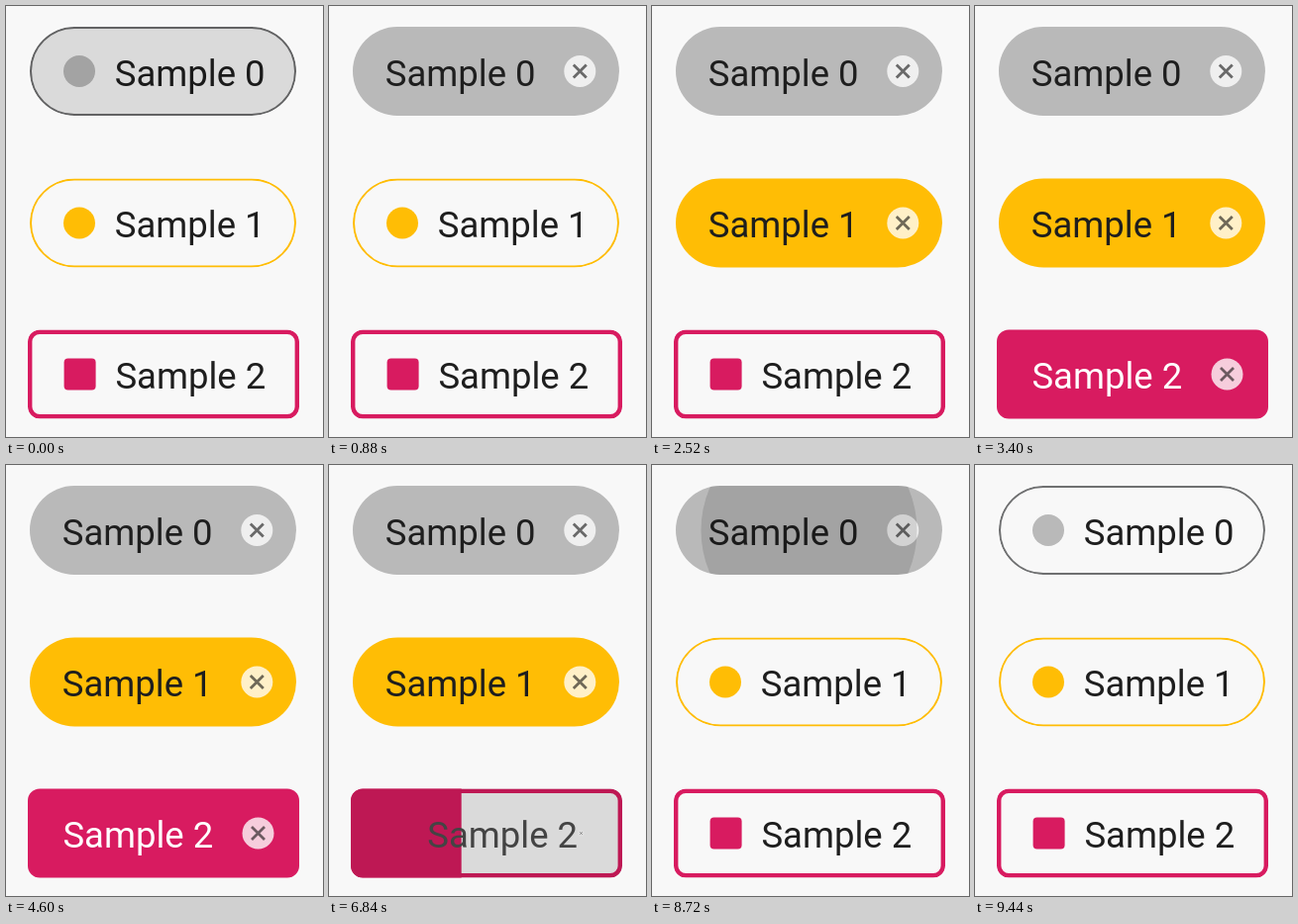
Animation of 320 by 436 pixels, one loop 10 s. Source, as an HTML page with a canvas:

```html
<!DOCTYPE html>
<html lang="en">
<head>
<meta charset="utf-8">
<title>Filter chips</title>
<style>
  html, body { margin: 0; width: 100%; height: 100%; overflow: hidden; background: #f8f8f8; }
  canvas { display: block; width: 320px; height: 436px; }
</style>
</head>
<body>
<canvas id="stage"></canvas>
<script>
const W = 320, H = 436, LOOP = 10000;
const SELECT = 450, DESELECT = 250;
const RIPPLE_GROW = 200, RIPPLE_HOLD = 180, RIPPLE_FADE = 200, RIPPLE_ALPHA = 0.12;

// on / off: [press time, start of the toggle]
const chips = [
  { label: 'Sample 0', x: 24, y: 21, w: 269, h: 90, round: 45, line: 2,
    color: '#b9b9b9', outline: '#6f7071', ink: [30, 30, 30],
    on: [-160, 50], off: [8640, 8760] },
  { label: 'Sample 1', x: 24, y: 174.5, w: 269, h: 90, round: 45, line: 2,
    color: '#ffbd05', outline: '#ffbd05', ink: [30, 30, 30],
    on: [1080, 1180], off: [7660, 7776] },
  { label: 'Sample 2', x: 22, y: 327.5, w: 274, h: 90, round: 12, line: 4.4,
    color: '#d81b60', outline: '#d81b60', ink: [255, 255, 255], square: true,
    on: [2760, 2860], off: [6520, 6713] }
];
const INK = [30, 30, 30];

const canvas = document.getElementById('stage');
const ctx = canvas.getContext('2d');
const ratio = window.devicePixelRatio || 1;
canvas.width = Math.round(W * ratio);
canvas.height = Math.round(H * ratio);

const clamp = v => Math.min(1, Math.max(0, v));
const lerp = (a, b, p) => a + (b - a) * p;

// cubic-bezier(.4, 0, .2, 1)
function ease(t) {
  if (t <= 0) return 0;
  if (t >= 1) return 1;
  let lo = 0, hi = 1, s = 0.5;
  for (let i = 0; i < 24; i++) {
    s = (lo + hi) / 2;
    const r = 1 - s;
    const x = 1.2 * r * r * s + 0.6 * r * s * s + s * s * s;
    if (x < t) lo = s; else hi = s;
  }
  return s * s * (3 - 2 * s);
}

function progress(chip, t) {
  return ease((t - chip.on[1]) / SELECT) - ease((t - chip.off[1]) / DESELECT);
}

function roundRect(x, y, w, h, r) {
  ctx.beginPath();
  ctx.roundRect(x, y, w, h, r);
}

function disc(x, y, r) {
  ctx.beginPath();
  ctx.arc(x, y, r, 0, Math.PI * 2);
  ctx.fill();
}

function drawClear(x, y, scale) {
  ctx.save();
  ctx.translate(x, y);
  ctx.scale(scale, scale);
  ctx.fillStyle = 'rgba(255,255,255,0.78)';
  disc(0, 0, 16);
  ctx.strokeStyle = 'rgba(0,0,0,0.56)';
  ctx.lineWidth = 2.8;
  ctx.beginPath();
  ctx.moveTo(-6.5, -6.5);
  ctx.lineTo(6.5, 6.5);
  ctx.moveTo(6.5, -6.5);
  ctx.lineTo(-6.5, 6.5);
  ctx.stroke();
  ctx.restore();
}

function drawRipple(chip, [press, start], t) {
  const fade = clamp((t - start - RIPPLE_HOLD) / RIPPLE_FADE);
  if (t < press || fade === 1) return;
  const age = t - press;
  const alpha = RIPPLE_ALPHA * clamp(age / 75) * (1 - fade);
  const radius = lerp(40, chip.w * 0.56, ease(age / RIPPLE_GROW));
  ctx.fillStyle = `rgba(0,0,0,${alpha})`;
  disc(chip.x + chip.w / 2, chip.y + chip.h / 2, radius);
}

function drawChip(chip, t) {
  const { x, y, w, h, round, line } = chip;
  const p = progress(chip, t);
  const cy = y + h / 2;
  const shift = chip.square ? 0.6 : 0;
  const dotX = 74 + shift;

  ctx.save();
  roundRect(x, y, w, h, round);
  ctx.clip();

  if (p < 1) {
    ctx.strokeStyle = chip.outline;
    ctx.lineWidth = line;
    roundRect(x + line / 2, y + line / 2, w - line, h - line, round - line / 2);
    ctx.stroke();
  }

  const half = lerp(16, x + w - dotX, p);
  ctx.fillStyle = chip.color;
  if (chip.square) {
    roundRect(dotX - half, cy - half, half * 2, half * 2, 4);
    ctx.fill();
  } else {
    disc(dotX, cy, half);
  }

  const rgb = INK.map((v, i) => Math.round(lerp(v, chip.ink[i], p)));
  ctx.fillStyle = `rgb(${rgb})`;
  ctx.fillText(chip.label, lerp(109.8, 56.8, p) + shift, cy + 14.5);

  if (p > 0) drawClear(253.3 + shift * 2, cy, p);
  drawRipple(chip, chip.on, t);
  drawRipple(chip, chip.off, t);
  ctx.restore();
}

function draw(now) {
  const t = now % LOOP;
  ctx.setTransform(ratio, 0, 0, ratio, 0, 0);
  ctx.fillStyle = '#f8f8f8';
  ctx.fillRect(0, 0, W, H);
  ctx.font = '36.5px Roboto, sans-serif';
  ctx.textBaseline = 'alphabetic';
  for (const chip of chips) drawChip(chip, t);
}

const begin = performance.now();
function tick() {
  draw(performance.now() - begin);
  requestAnimationFrame(tick);
}
tick();
</script>
</body>
</html>
```
